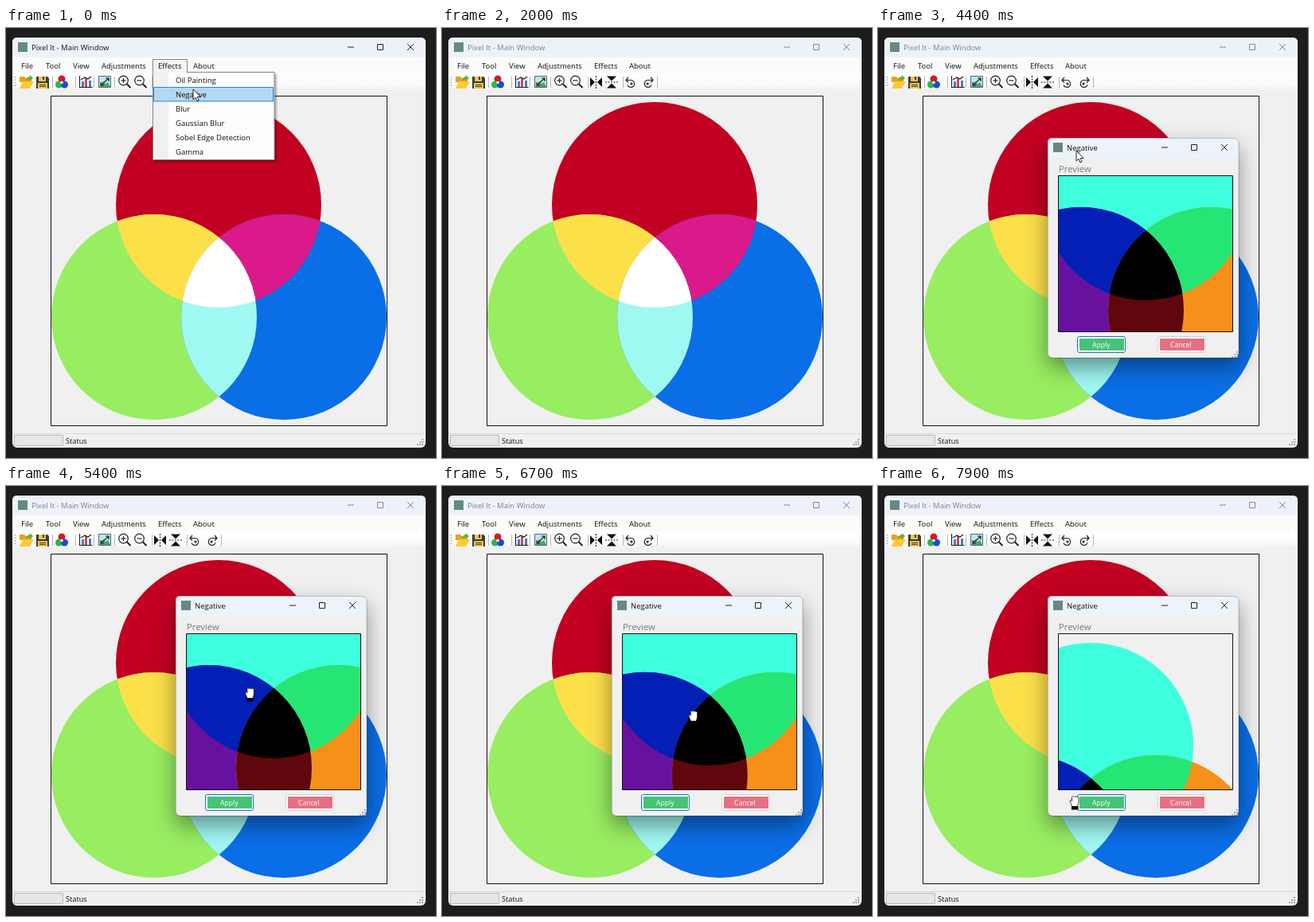
Write an HTML page that moves like this. It is 540 by 540 pixels and loops after 8 s.

```html
<!DOCTYPE html>
<html lang="en">
<head>
<meta charset="utf-8">
<title>Negative effect</title>
<style>
  html, body { margin: 0; width: 100%; height: 100%; overflow: hidden; background: #1d1d1d; }
  svg { display: block; width: 100vw; height: 100vh; }
  text { font: 9.5px "Open Sans", sans-serif; fill: #111; }
  .small { font-size: 8.6px; fill: #fff; }
  .line { fill: none; stroke: #222; stroke-width: 1.2; }
  .sep { stroke: #b8b8b8; }
  #preview { filter: invert(1); }
</style>
</head>
<body>
<svg viewBox="0 0 540 540">
  <defs>
    <clipPath id="inRed"><circle cx="267" cy="222" r="129"/></clipPath>
    <clipPath id="inGreen"><circle cx="186" cy="363" r="129"/></clipPath>
    <clipPath id="inBlue"><circle cx="349" cy="363" r="129"/></clipPath>
    <clipPath id="inPreview"><path d="M13.5 47.5h219v196h-219z"/></clipPath>
    <linearGradient id="bar" x2="0" y2="1">
      <stop stop-color="#fff"/><stop offset=".7" stop-color="#fafafa"/><stop offset="1" stop-color="#f0f0f0"/>
    </linearGradient>
    <filter id="shadow" x="-40%" y="-40%" width="180%" height="190%">
      <feDropShadow dx="0" dy="12" stdDeviation="14" flood-opacity=".42"/>
    </filter>
    <filter id="menuShadow"><feDropShadow dx="2" dy="2" stdDeviation="1" flood-opacity=".35"/></filter>
    <g id="venn">
      <circle cx="267" cy="222" r="129" fill="#c20022"/>
      <circle cx="186" cy="363" r="129" fill="#98ed61"/>
      <circle cx="349" cy="363" r="129" fill="#0a6ee6"/>
      <g clip-path="url(#inRed)">
        <circle cx="186" cy="363" r="129" fill="#fce04a"/>
        <circle cx="349" cy="363" r="129" fill="#da1a8a"/>
      </g>
      <g clip-path="url(#inGreen)">
        <circle cx="349" cy="363" r="129" fill="#a0f8f3"/>
        <g clip-path="url(#inRed)"><circle cx="349" cy="363" r="129" fill="#fff"/></g>
      </g>
    </g>
    <path id="controls" d="M-4 0h8M33.500 -3.500h7v7h-7zM71-4l8 8m0-8l-8 8"/>
    <g id="grip" fill="#aaa"><path d="M6 0h2v2h-2zM3 3h2v2h-2zM6 3h2v2h-2zM0 6h2v2h-2zM3 6h2v2h-2zM6 6h2v2h-2z"/></g>
    <g id="lens" class="line"><circle r="5.800"/><path d="M4 4l5 5" stroke-width="2"/><path d="M-3 0h6"/></g>
    <g id="rotate" class="line"><path d="M-5-3.500h6a4.500 4.500 0 1 1-5 6"/><path d="M-3-7l-3 3.500 3 3"/><circle cx="1" cy="1" r="1"/></g>
  </defs>

  <rect x="8" y="12" width="519" height="515" rx="6" fill="#f0f0f0"/>
  <path d="M8 37V18q0-6 6-6h507q6 0 6 6v19z" fill="#edf2fa"/>
  <path d="M8 37h519v20h-519z" fill="#fbfbfb"/>
  <path d="M8 57h519v21h-519z" fill="url(#bar)"/>
  <rect x="15" y="18" width="12" height="12" fill="#648b7c"/>
  <g id="caption">
    <text x="32" y="28">Pixel It - Main Window</text>
    <use href="#controls" x="433" y="24" fill="none" stroke="#222"/>
  </g>
  <g id="menuBar"></g>

  <!-- toolbar -->
  <path d="M11.500 61v14" stroke="#aaa" stroke-width="1.500" stroke-dasharray="1.500 2"/>
  <path class="sep" d="M58.500 61v14M87.500 61v14M110.500 61v14M136.500 61v14M183.500 61v14M227.500 61v14M270.500 61v14"/>
  <path d="M17 61h6l2 2h7v5h-15z" fill="#e3a41c"/>
  <path d="M17 76l4-9h14l-5 9z" fill="#ffc936"/>
  <path d="M25 66q1-5 5-5v-2l4 4-4 4v-2q-3 0-5 1z" fill="#69b52e"/>
  <path d="M38 61h14l2 2v13h-16z" fill="#393b46"/>
  <path d="M41 61h9v6h-9zM40 69h12v7h-12z" fill="#f5c643"/>
  <path d="M46 61h2v4h-2zM42 71h8v1h-8zM42 73h8v1h-8z" fill="#393b46"/>
  <circle cx="70" cy="64" r="4.500" fill="#dc1624"/>
  <circle cx="66.500" cy="71" r="4.500" fill="#26ba47"/>
  <circle cx="73.500" cy="71" r="4.500" fill="#174bd6"/>
  <circle cx="70" cy="68.500" r="1.800" fill="#fff"/>
  <path class="line" d="M92.500 60v14.500h16"/>
  <path d="M95 67h3v7h-3z" fill="#4a78c8"/><path d="M99 63h3v11h-3z" fill="#c94b50"/><path d="M104 66h3v8h-3z" fill="#4a78c8"/>
  <path class="line" d="M94 65l5-3 4 2 4-3" stroke-width=".8"/>
  <path d="M116.500 60.500h15v14h-15z" fill="#bfe6ee" stroke="#446a78"/>
  <path d="M117 74l5-7 3 3 3-2 3 6z" fill="#4fa55c"/>
  <path class="line" d="M119 72l10-9m-4 0h4v4M119 68v4h4" stroke-width="1"/>
  <use href="#lens" x="147.500" y="66"/><path class="line" d="M147.500 63v6"/>
  <use href="#lens" x="167.500" y="66"/>
  <g id="flip"><path d="M186 62l6 6-6 6zM201 62l-6 6 6 6z" fill="#111"/><path class="line" d="M193.500 60v16" stroke-dasharray="2 1.500" stroke-width="1"/></g>
  <use href="#flip" transform="translate(213 68) rotate(90) translate(-193.500 -68)"/>
  <use href="#rotate" x="237" y="69"/>
  <use href="#rotate" transform="translate(259 69) scale(-1 1)"/>

  <use href="#venn"/>
  <path d="M56.500 85.500h422v414h-422z" fill="none" stroke="#111"/>
  <path d="M8 509.500h519" stroke="#d7d7d7"/>
  <path d="M10.500 511.500h61v13h-61z" fill="#e6e6e6" stroke="#bcbcbc"/>
  <text x="75" y="522" style="font-size:9.2px">Status</text>
  <use href="#grip" x="516" y="516"/>

  <g id="menu">
    <path d="M184.500 55.500v-16h43v16" fill="#f3f3f3" stroke="#858585"/>
    <text x="191" y="50.500">Effects</text>
    <path d="M184.500 55.500h152.500v110h-152.500z" fill="#fdfdfd" stroke="#858585" filter="url(#menuShadow)"/>
    <path d="M185 56h19v109h-19z" fill="#f0f0f0"/><path d="M185 55.500h42" stroke="#f3f3f3"/>
    <path d="M185.500 74.500h150v17.500h-150z" fill="#b5d7f1" stroke="#2687d4"/>
  </g>

  <g id="dialog">
    <rect width="240" height="276" rx="6" fill="#f0f0f0" filter="url(#shadow)"/>
    <path d="M0 25V6q0-6 6-6h228q6 0 6 6v19z" fill="#edf3fb"/>
    <rect x=".500" y=".500" width="239.500" height="276" rx="6" fill="none" stroke="#000" stroke-opacity=".22"/>
    <rect x="7" y="6" width="12" height="12" fill="#648b7c"/>
    <text x="24" y="16">Negative</text>
    <use href="#controls" x="147" y="12" fill="none" stroke="#222"/>
    <text x="14" y="42.500" style="font-size:11.3px;fill:#7a7a7a">Preview</text>
    <g clip-path="url(#inPreview)"><g id="preview"><use id="pan" href="#venn"/></g></g>
    <path d="M13.500 47.500h219v196h-219z" fill="none" stroke="#111"/>
    <rect x="37.500" y="249.500" width="60" height="20" rx="2.500" fill="#fff" stroke="#1975ba"/>
    <path d="M40 252h56v15h-56z" fill="#45c376"/>
    <text class="small" x="56" y="263">Apply</text>
    <rect x="138.500" y="249.500" width="60" height="20" rx="2.500" fill="#fff" stroke="#d2d2d2"/>
    <path d="M141 252h56v15h-56z" fill="#e47182"/>
    <text class="small" x="154" y="263">Cancel</text>
    <use href="#grip" x="231" y="268"/>
  </g>

  <path id="arrow" d="M0 0v13l3-2.800 2 4.800 2.200-1-2-4.500h4z" fill="#fff" stroke="#111" stroke-width=".9"/>
  <g id="hand">
    <path d="M-3 6l-2.500-6q-1-3 1-2.500l1 1v-5q1-2 2 0 1-2 2.200 0 1.300-1.500 2.200 0 1.500-1 2 1v6l-1.500 5.500z" fill="#fff" stroke="#111" stroke-width=".8"/>
    <path d="M-4 5h8.500v4.500h-8.500z" fill="#080808"/>
  </g>
</svg>
<script>
  const $ = id => document.getElementById(id);
  const LOOP = 8000, STEP = 100;

  const label = (x, y, text) => `<text x="${x}" y="${y}">${text}</text>`;
  $('menuBar').innerHTML = [['File', 19], ['Tool', 50], ['View', 84], ['Adjustments', 120], ['Effects', 191], ['About', 235]]
    .map(([text, x]) => label(x, 50.5, text)).join('');
  $('menu').innerHTML += ['Oil Painting', 'Negative', 'Blur', 'Gaussian Blur', 'Sobel Edge Detection', 'Gamma']
    .map((text, i) => label(213, 69 + 18 * i, text)).join('');

  // Keys are [time, x, y].
  const dialogPath = [[3200, 89, 62], [3300, 190, 122], [3400, 240, 152], [3600, 238, 151], [4000, 215, 139], [4200, 213, 138]];
  const arrowPath = [[0, 235, 77], [800, 235, 78], [1300, 60, -30]];
  const reachPath = [[4600, 249, 154], [5000, 268, 182], [5500, 316, 281]];
  const handPath = [[5500, 316, 281], [6100, 316, 281], [6200, 307, 281], [6500, 270, 279], [6850, 350, 298],
                    [7200, 462, 328], [7550, 370, 372], [7900, 247, 397]];

  function along(path, t) {
    const i = path.findIndex(key => key[0] > t);
    if (i <= 0) return path[i ? path.length - 1 : 0].slice(1);
    const [a, b] = [path[i - 1], path[i]], k = (t - a[0]) / (b[0] - a[0]);
    return [a[1] + (b[1] - a[1]) * k, a[2] + (b[2] - a[2]) * k];
  }
  const show = (id, on) => $(id).style.display = on ? '' : 'none';
  const move = (id, x, y) => $(id).setAttribute('transform', `translate(${x} ${y})`);

  function draw(now) {
    const t = Math.floor(now % LOOP / STEP) * STEP;
    const [dx, dy] = along(dialogPath, t);
    const [hx, hy] = along(handPath, t);
    const grabbing = t >= 5200;

    show('menu', t < 700);
    $('caption').style.opacity = t < 800 ? 1 : .5;
    show('dialog', t >= 3200);
    move('dialog', dx, dy);

    // The picture follows the hand until its edge meets the preview frame.
    const panX = Math.min(171, hx - 247), panY = Math.min(104, hy - 290);
    move('pan', panX - 213, panY - 138);

    show('arrow', !grabbing && (t < 1300 || t >= 3200));
    show('hand', grabbing);
    move('arrow', ...(t < 3200 ? along(arrowPath, t) : t < 4600 ? [dx + 36, dy + 16] : along(reachPath, t)));
    move('hand', ...(t < 5500 ? along(reachPath, t) : [hx, hy]));
    requestAnimationFrame(draw);
  }
  requestAnimationFrame(draw);
</script>
</body>
</html>
```
